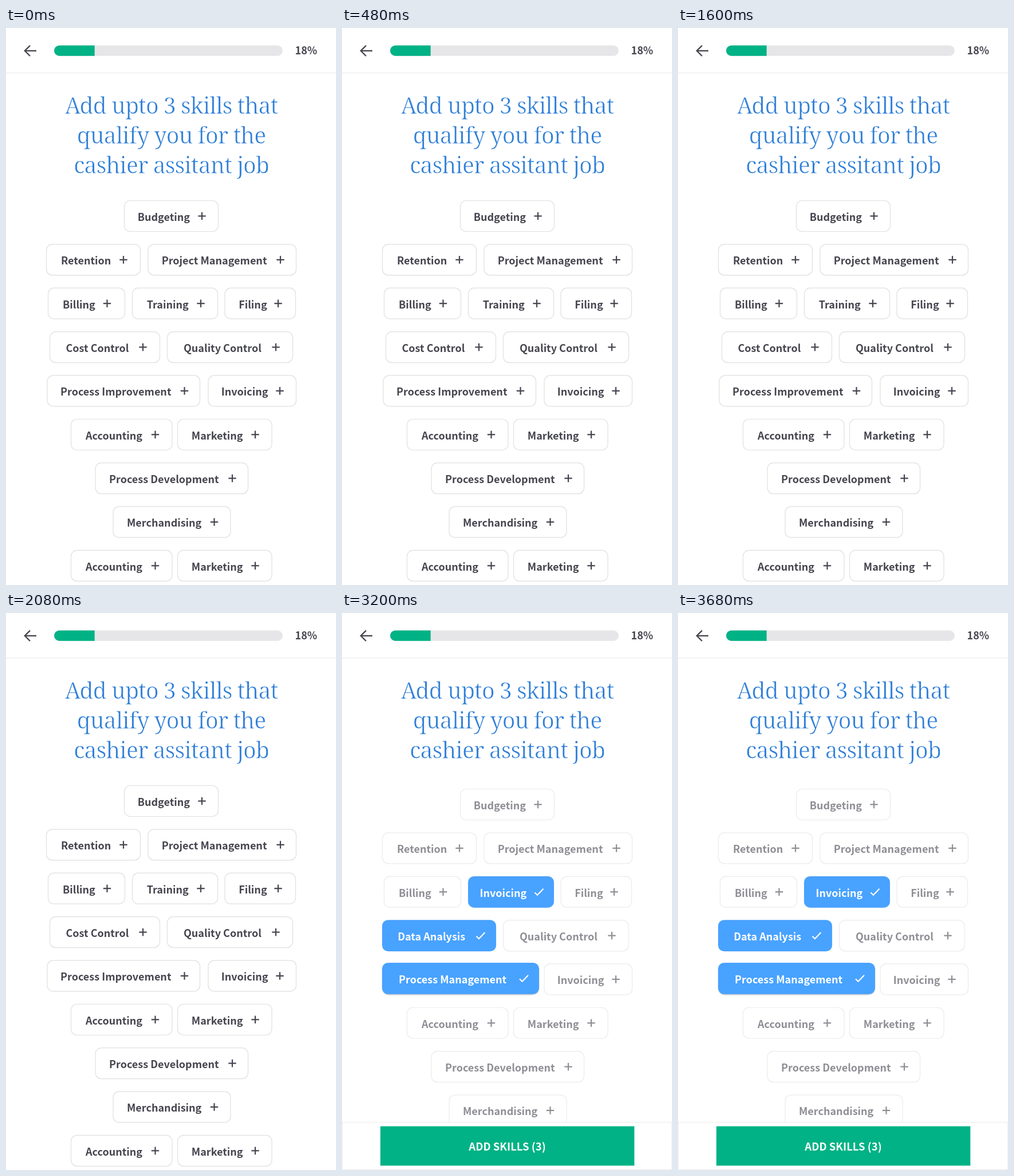
Animation of 576 by 973 pixels, one loop 4000 ms. Source, as an HTML page with a canvas:

```html
<!DOCTYPE html>
<html lang="en">
<head>
<meta charset="utf-8">
<title>Skill picker</title>
<style>
  html, body { margin: 0; width: 100%; height: 100%; overflow: hidden; background: #fff; }
  canvas { display: block; }
</style>
</head>
<body>
<canvas id="stage" width="576" height="973"></canvas>
<script>
const ctx = document.getElementById('stage').getContext('2d');
const W = 576, H = 973, STEP = 800;
const SANS = '"Noto Sans CJK SC", "Noto Sans CJK JP", "Noto Sans CJK", sans-serif';
const LABEL = `600 18px ${SANS}`;
const INK = '#45454f', BLUE = '#48a2ff', GREEN = '#00b285';
const ROW_PITCH = 76.35, CHIP_H = 54;

// label, left, right, text x, icon x
const budgeting = ['Budgeting', 206.5, 370.5, 229.8, 342];
const accounting = ['Accounting', 113.5, 290, 139, 260.5];
const marketing = ['Marketing', 299.5, 464, 323.8, 435];
const development = ['Process Development', 156, 422.5, 180, 395];
const rows = [
  [budgeting],
  [['Retention', 70.5, 234.5, 96, 205], ['Project Management', 248, 506.5, 271.7, 479]],
  [['Billing', 73.5, 207.5, 99, 176.5], ['Training', 220.5, 369.5, 245.7, 340], ['Filing', 382, 505.5, 406.2, 475]],
  [['Cost Control', 76.5, 268.5, 104.5, 239], ['Quality Control', 281.5, 500.5, 310, 471]],
  [['Process Improvement', 72, 338.5, 95, 311.5], ['Invoicing', 353, 506.5, 375.8, 478]],
  [accounting, marketing],
  [development],
  [['Merchandising', 187, 392, 211, 363.5]],
  [accounting, marketing],
  [development]
];

// Each pick covers the chip of the same name
const picks = {
  'Training': ['Invoicing', 220, 370, 240.5, 344],
  'Cost Control': ['Data Analysis', 70, 269, 97.2, 242],
  'Process Improvement': ['Process Management', 70, 344, 99, 317.5]
};

const list = { scroll: 0, top: 301.5, picked: [], lifted: [] };
const scenes = [
  list,
  { ...list, scroll: -290.2 },
  list,
  { ...list, top: 325.8, picked: ['Training', 'Cost Control'], lifted: ['Training', 'Cost Control'], buttonX: 73.3 },
  { ...list, top: 307.5, picked: Object.keys(picks), lifted: ['Process Improvement'], buttonX: 67, faded: true }
];

function text(str, x, y, font, color, align = 'left') {
  ctx.font = font;
  ctx.fillStyle = color;
  ctx.textAlign = align;
  ctx.fillText(str, x, y);
}

function line(color, width, ...points) {
  ctx.strokeStyle = color;
  ctx.lineWidth = width;
  ctx.beginPath();
  points.forEach(([x, y]) => ctx.lineTo(x, y));
  ctx.stroke();
}

function box(x, y, w, h, r, fill, stroke) {
  ctx.beginPath();
  ctx.roundRect(x, y, w, h, r);
  ctx.fillStyle = fill;
  ctx.fill();
  if (!stroke) return;
  ctx.strokeStyle = stroke;
  ctx.lineWidth = 1.2;
  ctx.stroke();
}

function chip([label, left, right, textX, iconX], y, faded) {
  const color = faded ? '#8e8e95' : INK;
  const cy = y + 27;
  box(left, y, right - left, CHIP_H, 10.5, '#fff', faded ? '#e9ebed' : '#dde0e3');
  text(label, textX, y + 35.5, LABEL, color);
  line(color, 2.2, [iconX - 6.7, cy], [iconX + 6.7, cy]);
  line(color, 2.2, [iconX, cy - 6.7], [iconX, cy + 6.7]);
}

function pickedChip([label, left, right, textX, iconX], y, lifted) {
  const cy = y + 27;
  ctx.save();
  if (lifted) {
    ctx.shadowColor = 'rgba(60, 90, 130, 0.3)';
    ctx.shadowBlur = 2;
    ctx.shadowOffsetY = 1;
  }
  box(left, y - 0.3, right - left, CHIP_H + 0.8, 10.5, BLUE);
  ctx.restore();
  text(label, textX, y + 35.5, LABEL, '#fff');
  line('#fff', 2.1, [iconX - 7.5, cy + 1], [iconX - 3, cy + 5.5], [iconX + 7.5, cy - 5.5]);
}

function heading(scroll) {
  ctx.letterSpacing = '-1px';
  ctx.lineJoin = 'round';
  ['Add upto 3 skills that', 'qualify you for the', 'cashier assitant job'].forEach((str, i) => {
    const y = 149.8 + 52 * i + scroll;
    text(str, 288.5, y, '300 39.3px "Noto Serif", serif', '#2f7fd8', 'center');
    // A thin white outline gives the letters a light weight
    ctx.strokeStyle = '#fff';
    ctx.lineWidth = 0.8;
    ctx.strokeText(str, 288.5, y);
  });
  ctx.lineJoin = 'miter';
  ctx.letterSpacing = '0px';
}

function chips({ scroll, top, picked, lifted, faded }) {
  rows.forEach((row, i) => {
    const y = top + scroll + i * ROW_PITCH;
    row.forEach(item => {
      const [name, left, right] = item;
      if (!picked.includes(name)) return chip(item, y, faded);
      const raised = lifted.includes(name);
      box(left, y, right - left, CHIP_H, 10.5, '#fff', '#dde0e3');
      pickedChip(picks[name], raised ? y - 1.6 : y, raised);
    });
  });
}

function header() {
  ctx.fillStyle = '#fff';
  ctx.fillRect(0, 0, W, 78);
  ctx.fillStyle = '#e8e8e9';
  ctx.fillRect(0, 78, W, 1);
  line(INK, 2.3, [33, 39.8], [53, 39.8]);
  line(INK, 2.3, [42, 30.6], [32.8, 39.8], [42, 49]);
  box(84, 30.5, 399, 18.2, 9.1, '#e6e6e8');
  box(84, 30.5, 70.7, 18.2, [9.1, 0, 0, 9.1], GREEN);
  text('18%', 504.6, 46, LABEL, INK);
}

function footer({ buttonX, picked }) {
  ctx.fillStyle = '#fff';
  ctx.fillRect(0, 889, W, H - 889);
  ctx.strokeStyle = '#ededee';
  ctx.lineWidth = 1;
  ctx.strokeRect(0.5, 889.5, W - 1, H - 890);
  ctx.fillStyle = GREEN;
  ctx.fillRect(buttonX, 896.6, 443.3, 68.8);
  text(`ADD SKILLS (${picked.length})`, buttonX + 221.5, 939, `600 18.5px ${SANS}`, '#fff', 'center');
}

function draw(ms) {
  const scene = scenes[Math.floor(ms / STEP) % scenes.length];
  ctx.fillStyle = '#fff';
  ctx.fillRect(0, 0, W, H);
  heading(scene.scroll);
  chips(scene);
  text('Skip for now', 288.5, 1240.2 + scene.scroll, `400 19px ${SANS}`, '#686871', 'center');
  header();
  if (scene.buttonX) footer(scene);
}

const start = performance.now();
function tick() {
  draw(performance.now() - start);
  requestAnimationFrame(tick);
}
tick();
</script>
</body>
</html>
```
